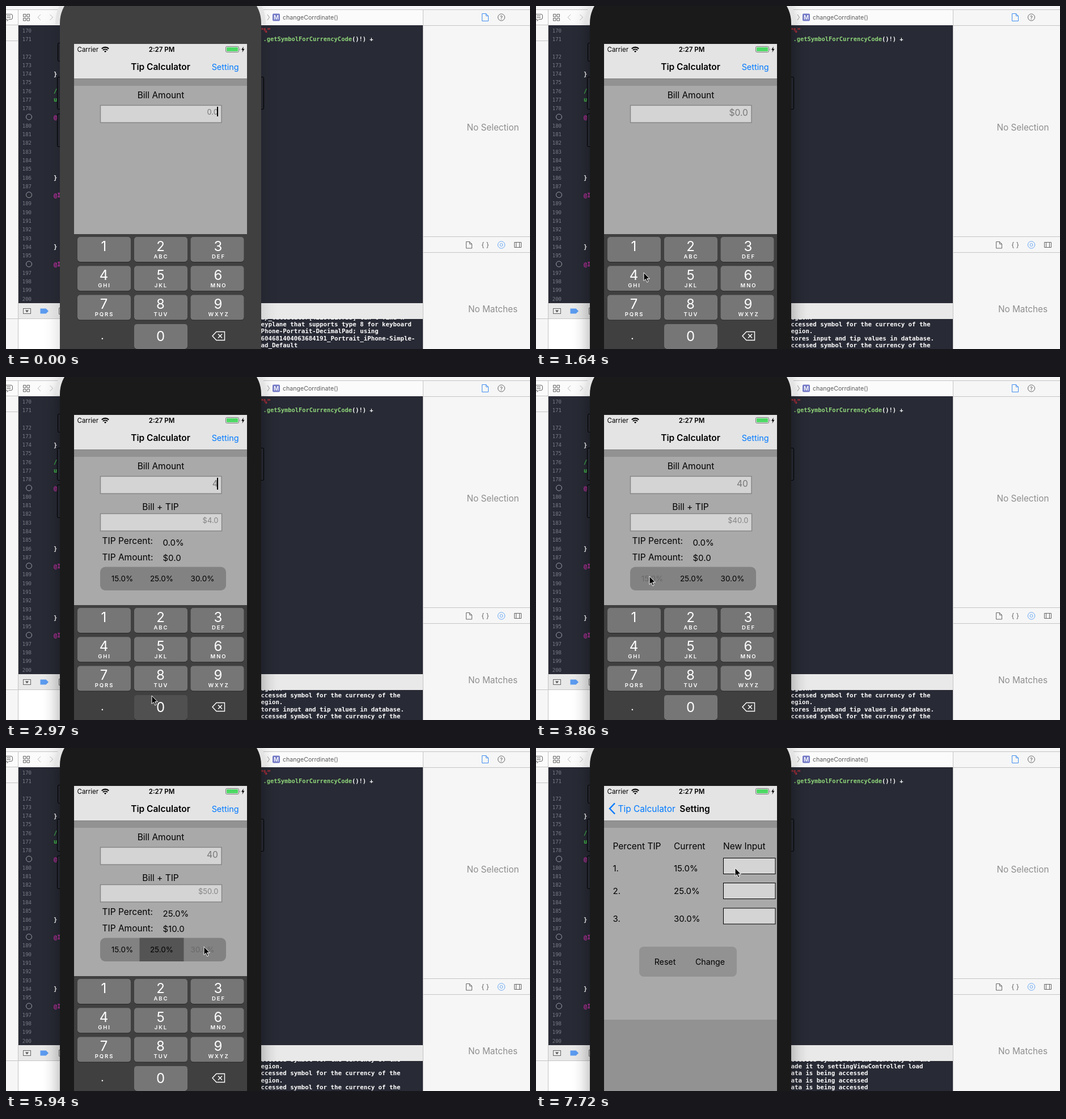
These frames come from a looping animation (924 by 606 pixels, 8000 ms). An HTML page:

```html
<!DOCTYPE html>
<html lang="en">
<head>
<meta charset="utf-8">
<title>Tip Calculator</title>
<style>
html, body { margin: 0; width: 100%; height: 100%; overflow: hidden; background: #f6f6f6; }
svg { display: block; width: 924px; height: 606px; }
text { font-family: Inter, Roboto, sans-serif; white-space: pre; }
.mono { font-family: "DejaVu Sans Mono", "Noto Sans Mono", monospace; }
.log { font-size: 10.76px; font-weight: 700; fill: #fff; }
.code { font-size: 10.4px; font-weight: 700; }
.num { font-size: 9px; fill: #7b7f89; }
.ui { font-size: 15.5px; }
.bold { font-weight: 600; }
.blue { fill: #007aff; }
.dim { fill: #8e8e8e; }
.mid { text-anchor: middle; }
.end { text-anchor: end; }
.digit { font-size: 24px; font-weight: 400; fill: #fff; }
.abc { font-size: 9.5px; font-weight: 600; letter-spacing: 1.9px; fill: #fff; }
.line { fill: none; stroke: #666; }
.field { fill: #d4d4d4; stroke: #858585; stroke-width: 1.4; }
.input { fill: #d4d4d4; stroke: #000; }
.btn { fill: #22242c; stroke: #000; }
</style>
</head>
<body>
<svg viewBox="0 0 924 606">
  <defs>
    <clipPath id="screen"><rect x="120" y="67" width="305" height="539"/></clipPath>
    <clipPath id="pill"><rect x="166" y="335.5" width="222" height="41.5" rx="9"/></clipPath>
    <filter id="blur" x="-30%" y="-30%" width="160%" height="160%"><feGaussianBlur stdDeviation="14"/></filter>
  </defs>

  <!-- editor window -->
  <rect width="924" height="606" fill="#f6f6f6"/>
  <rect y="7" width="735" height="27" fill="#fbfbfb"/>
  <rect x="22" y="34" width="713" height="572" fill="#282a35"/>
  <rect x="22" y="553" width="428" height="53" fill="#fff"/>
  <g id="log"></g>
  <rect x="22" y="525" width="713" height="28" fill="#e9e9e9"/>
  <path stroke="#c4c4c4" fill="none" d="M0 6.5H924M0 33.5H22M736 34.5H924M0 61.5H22M21.5 7V606M735.5 7V606M736 407.5H924M736 435.5H924M0 552.5H95"/>
  <g id="code"></g>
  <text class="mono code" x="448" y="47" fill="#e0323c">"%"</text>
  <text class="mono code" x="453.5" y="62" fill="#8fd67a">.getSymbolForCurrencyCode<tspan fill="#fff">()!) +</tspan></text>

  <!-- toolbars -->
  <path class="line" d="M0 14.5H9Q11.5 14.5 11.5 17V21Q11.5 23.5 9 23.5H5L2 26.5V23.5H0M1 17.5H8M1 20.5H8"/>
  <path class="line" d="M30.5 14.5h4.5v4.5h-4.5zM37 14.5h4.5v4.5h-4.5zM30.5 21.5h4.5v4.5h-4.5zM37 21.5h4.5v4.5h-4.5z"/>
  <path class="line" style="stroke:#bbb" d="M61 15L56 20L61 25M77.5 15L82.5 20L77.5 25"/>
  <text x="448.5" y="24" font-size="10.6" fill="#666">ft</text>
  <path class="line" style="stroke:#999" d="M461 15L464.5 20L461 25"/>
  <rect x="470" y="13.5" width="13" height="13" rx="2" fill="#7379c6"/>
  <text class="mid bold" x="476.5" y="23.7" font-size="10" fill="#fff">M</text>
  <text x="488" y="24" font-size="10.6" fill="#5c5c5c">changeCorrdinate()</text>
  <path class="line" style="stroke:#3f8df0" d="M839.5 13.5h7l4 4v9h-11zM846.5 13.5v4h4"/>
  <circle class="line" cx="873.5" cy="20" r="6"/>
  <text class="mid" x="873.5" y="23.5" font-size="9.5" fill="#555">?</text>
  <text class="mid dim" x="858.5" y="220" font-size="15.3">No Selection</text>
  <path class="line" d="M811.5 416.5h6l4 4v7.5h-10zM817.5 416.5v4h4"/>
  <text class="mid" x="845" y="426" font-size="12" fill="#666">{ }</text>
  <circle class="line" style="stroke:#6aa9f5" cx="873.5" cy="422" r="6.2"/>
  <circle class="line" style="stroke:#6aa9f5" cx="873.5" cy="422" r="2.5"/>
  <path class="line" d="M896.5 417.5h12v9h-12zM899.5 417.5v9M905.5 417.5v9"/>
  <text class="mid dim" x="858.5" y="541" font-size="15.3">No Matches</text>
  <rect class="line" x="30.5" y="534.5" width="13" height="9"/>
  <path d="M34 537.5h6l-3 4z" fill="#555"/>
  <path d="M60.5 534.5h10l4.5 4.5l-4.5 4.5h-10z" fill="#5b9bf0"/>
  <path class="line" d="M96 533.5H93.5V544.5H96"/>

  <!-- phone -->
  <rect id="shade" x="92" y="-20" width="361" height="740" rx="60" filter="url(#blur)"/>
  <path d="M87 32Q88 10 94 0H104Q96 14 95 32ZM458 32Q457 10 451 0H441Q449 14 450 32Z" fill="#e4e4e4"/>
  <rect class="btn" x="91.5" y="65.5" width="8" height="32" rx="2"/>
  <rect class="btn" x="90.5" y="125.5" width="8" height="57" rx="2"/>
  <rect class="btn" x="90.5" y="190.5" width="8" height="58" rx="2"/>
  <rect class="btn" x="446.5" y="125.5" width="8" height="57" rx="2"/>
  <rect id="bezel" x="95" y="-30" width="355" height="760" rx="60"/>

  <g clip-path="url(#screen)">
    <rect x="120" y="67" width="305" height="539" fill="#929292"/>
    <g id="home">
      <rect x="120" y="141" width="305" height="465" fill="#a9a9a9"/>
      <text class="ui mid" x="273" y="163">Bill Amount</text>
      <rect class="field" x="166.5" y="175.5" width="213.5" height="30.5"/>
      <text id="bill" class="end" x="374" fill="#777"></text>
      <rect id="caret" x="372" y="178" width="2"/>
      <g id="result">
        <text class="ui mid" x="272.5" y="235">Bill + TIP</text>
        <rect class="field" x="166.5" y="241.5" width="214" height="30.5"/>
        <text id="total" class="end" x="374.5" y="258" font-size="13" fill="#858585"></text>
        <text class="ui" x="169.5" y="295">TIP Percent:</text>
        <text class="ui" x="169.5" y="324">TIP Amount:</text>
        <text id="rate" x="276.5" y="298" font-size="15"></text>
        <text id="tip" x="276.5" y="324.5" font-size="15"></text>
        <g clip-path="url(#pill)">
          <rect x="166" y="335" width="222" height="43" fill="#828282"/>
          <rect id="pick" y="335" height="43" fill="#545454"/>
        </g>
        <g id="seg" class="mid" font-size="13.5"></g>
      </g>
    </g>
    <g id="keys"><rect x="120" y="403" width="305" height="203" fill="#404040"/></g>
    <g id="setup">
      <rect x="120" y="141" width="305" height="339" fill="#a9a9a9"/>
      <rect x="120" y="480" width="305" height="126" fill="#929292"/>
      <g class="ui">
        <text x="135.5" y="179">Percent TIP</text>
        <text x="243" y="179">Current</text>
        <text x="330" y="179">New Input</text>
      </g>
      <g id="rows" font-size="15"></g>
      <rect x="182" y="351" width="172" height="53" rx="8" fill="#929292"/>
      <g class="mid" font-size="14.2">
        <text x="227.5" y="383">Reset</text>
        <text x="307" y="383">Change</text>
      </g>
    </g>
    <rect x="120" y="67" width="305" height="61" fill="#e4e4e4"/>
    <rect x="120" y="128" width="305" height="13" fill="#929292"/>
    <path d="M120 128.5H425" stroke="#848484"/>
    <g id="navHome">
      <text class="ui bold mid" x="272.5" y="112.5">Tip Calculator</text>
      <text id="setting" class="blue end" x="410.5" y="112.5" font-size="14.4">Setting</text>
    </g>
    <g id="navSetup">
      <path d="M139 97.5L130 107L139 116.5" fill="none" stroke="#007aff" stroke-width="2.5"/>
      <text class="blue" x="144.5" y="112.5" font-size="15.4">Tip Calculator</text>
      <text class="ui bold mid" x="280" y="112.5">Setting</text>
    </g>
    <text x="125.5" y="81" font-size="11.5">Carrier</text>
    <g fill="none" stroke="#000" stroke-width="2.1">
      <path d="M168.8 75.4A9 9 0 0 1 181.2 75.4M171 78A6 6 0 0 1 179 78"/>
      <path d="M173 80L175 82L177 80A3 3 0 0 0 173 80Z" fill="#000" stroke="none"/>
    </g>
    <text class="bold mid" x="274.5" y="81" font-size="11.5">2:27 PM</text>
    <rect x="387.5" y="71.5" width="23" height="10" rx="2" fill="none" stroke="#777"/>
    <rect x="389" y="73" width="20" height="7" rx="1" fill="#4cd964"/>
    <path d="M412 74.5v4q1.5-2 0-4z" fill="#777"/>
    <path d="M419 71.5L415 77.5H417.5L416.5 82L420.5 75.8H418Z"/>
  </g>

  <path id="cursor" d="M0 0V14.5L3.3 11.5L5.7 17L8 16L5.7 10.7H10.3Z" stroke="#fff"/>
</svg>

<script>
const LOOP = 8000, STEP = 148.2;
const $ = id => document.getElementById(id);
const add = (id, html) => $(id).insertAdjacentHTML('beforeend', html);
const text = (x, y, s, attrs = '') => `<text x="${x}" y="${y}" ${attrs}>${s}</text>`;

// gutter and visible code
const lineY = n => n < 172 ? 43 + (n - 170) * 15.3 : 89 + (n - 172) * 15.29;
const dots = [179, 188, 196];
const snippets = {
  174: ['}', '#fff'], 186: ['}', '#fff'], 194: ['}', '#fff'],
  176: ['/', '#41c04a'], 177: ['u', '#41c04a'],
  179: ['@', '#c132a5'], 188: ['@I', '#c132a5'], 196: ['@I', '#c132a5']
};
for (let n = 170; n <= 200; n++) {
  const y = lineY(n);
  add('code', dots.includes(n)
    ? `<circle cx="40.5" cy="${y}" r="5" fill="none" stroke="#a0a3aa"/>`
    : text(45, y + 3.5, n, 'class="mono num end"'));
  if (snippets[n]) {
    const [s, color] = snippets[n];
    add('code', text(84, y + 4, s, `class="mono code" fill="${color}"`));
  }
}

// keypad
const cols = [126, 226, 325.5], mids = [172.5, 272.5, 374];
const labels = ['', 'ABC', 'DEF', 'GHI', 'JKL', 'MNO', 'PQRS', 'TUV', 'WXYZ'];
function key(digit, col, row, label) {
  const x = cols[col], y = 408 + row * 51.3;
  add('keys', `<rect x="${x}" y="${y + 1}" width="94" height="44" rx="5" fill="#262626"/>
    <rect id="key${digit}" x="${x}" y="${y}" width="94" height="44" rx="5" fill="#767676"/>`
    + text(mids[col], y + (row < 3 ? 24.5 : 30), digit, 'class="digit mid"')
    + text(mids[col] + 1, y + 37.7, label, 'class="abc mid"'));
}
labels.forEach((s, i) => key(i + 1, i % 3, Math.floor(i / 3), s));
key(0, 1, 3, '');
add('keys', text(170, 589, '.', 'class="digit mid" style="font-size:20px"')
  + '<path d="M364 583L371 575.5H385.5V590.5H371ZM374 579.5L381 586.5M381 579.5L374 586.5" fill="none" stroke="#fff" stroke-width="1.4"/>');

// segments and settings rows
const rates = ['15.0%', '25.0%', '30.0%'];
rates.forEach((r, i) => {
  add('seg', text([205, 274.5, 346.5][i], 361.3, r));
  const y = [217.5, 258, 306.5][i];
  add('rows', text(135.5, y, i + 1 + '.') + text(243, y, r)
    + `<rect class="input" x="330.5" y="${[194.5, 238.5, 283][i]}" width="91.5" height="28"/>`);
});
const edges = [166, 235.5, 313.5, 388];

// console
const symbol = 'ccessed symbol for the currency of the', region = 'egion.';
const data = 'ata is being accessed';
const logs = [
  ["ap_calculator[4218:210733] Can't find k", 'eyplane that supports type 8 for keyboard', 'Phone-Portrait-DecimalPad; using',
    '604681404063684191_Portrait_iPhone-Simple-', 'ad_Default'],
  [region, symbol, region, 'tores input and tip values in database.', symbol],
  [symbol, region, symbol, region, symbol],
  [symbol, 'ade it to settingViewController load', data, data, data]
];
for (let i = 0; i < 5; i++) add('log', text(449.5, 553.7 + i * 12.35, '', 'class="mono log"'));

// timelines: [step, value]
const bills = [[0, '0.0'], [5, '$0.0'], [13, '4'], [21, '40']];
const totals = [[0, ''], [13, '$4.0'], [21, '$40.0'], [27, '$46.0'], [35, '$50.0'], [41, '$52.0']];
const picks = [[0, -1], [27, 0], [35, 1], [41, 2]];
const presses = [[0, -1], [26, 0], [27, -1], [34, 1], [35, -1], [40, 2], [41, -1]];
const tips = ['$6.0', '$10.0', '$12.0'];
const logAt = [[0, 0], [4, 1], [27, 2], [47, 3]];
const carets = [[0, 1], [5, 0], [7, 1], [10, 0], [13, 1], [17, 0], [20, 1], [24, 0], [27, 1],
  [31, .5], [32, 0], [35, 1], [38, 0], [42, 1], [45, 0]];
const slides = [[0, 0], [49, .35], [50, .82], [51, .98], [52, 1]];
const path = [[5, 330, 400], [9, 190, 471], [13, 190, 471], [16, 240, 548], [18, 257, 563], [22, 257, 563],
  [25, 200, 352], [27, 200, 352], [29, 278, 351], [35, 278, 351], [38, 349, 351], [41, 349, 351],
  [44, 386, 101], [46, 386, 101], [48, 257, 179], [49, 257, 179], [52, 351, 212], [60, 351, 212]];

const at = (list, k) => list.filter(e => e[0] <= k).pop()[1];
const set = (id, name, value) => $(id).setAttribute(name, value);
const shift = (id, x, y = 0) => set(id, 'transform', `translate(${x} ${y})`);

function pointer(k) {
  const i = Math.max(1, path.findIndex(p => p[0] > k));
  const [k0, x0, y0] = path[i - 1], [k1, x1, y1] = path[i];
  const u = Math.max(0, (k - k0) / (k1 - k0)), e = u * u * (3 - 2 * u);
  return [x0 + (x1 - x0) * e, y0 + (y1 - y0) * e];
}

function draw(k) {
  const active = k >= 3;
  set('bezel', 'fill', active ? '#1a1a1a' : '#404040');
  set('shade', 'opacity', active ? .32 : .14);
  [...$('log').children].forEach((line, i) => line.textContent = logs[at(logAt, k)][i]);

  const small = k < 5;
  $('bill').textContent = at(bills, k);
  set('bill', 'font-size', small ? 13 : 15.7);
  set('bill', 'y', small ? 191.5 : 194);
  set('caret', 'height', small ? 17 : 21);
  set('caret', 'opacity', at(carets, k));

  const pick = at(picks, k), press = at(presses, k);
  set('result', 'opacity', k >= 13 ? 1 : 0);
  $('total').textContent = at(totals, k);
  $('rate').textContent = rates[pick] || '0.0%';
  $('tip').textContent = tips[pick] || '$0.0';
  set('pick', 'x', edges[pick] || 0);
  set('pick', 'width', pick < 0 ? 0 : edges[pick + 1] - edges[pick]);
  [...$('seg').children].forEach((s, i) => s.setAttribute('fill', i === press ? '#696969' : '#000'));
  set('key4', 'fill', k === 12 ? '#505050' : '#767676');
  set('key0', 'fill', k === 19 || k === 20 ? '#505050' : '#767676');
  set('setting', 'opacity', k >= 46 ? .2 : 1);

  const p = at(slides, k);
  shift('home', -92 * p);
  shift('keys', -305 * p);
  shift('setup', 305 * (1 - p));
  shift('navHome', -110 * p);
  shift('navSetup', 120 * (1 - p));
  set('navHome', 'opacity', 1 - p);
  set('navSetup', 'opacity', p);

  shift('cursor', ...pointer(k));
  set('cursor', 'opacity', k < 5 ? 0 : 1);
}

let start;
function tick(now) {
  start ??= now;
  draw(Math.floor(((now - start) % LOOP) / STEP));
  requestAnimationFrame(tick);
}
draw(0);
requestAnimationFrame(tick);
</script>
</body>
</html>
```
